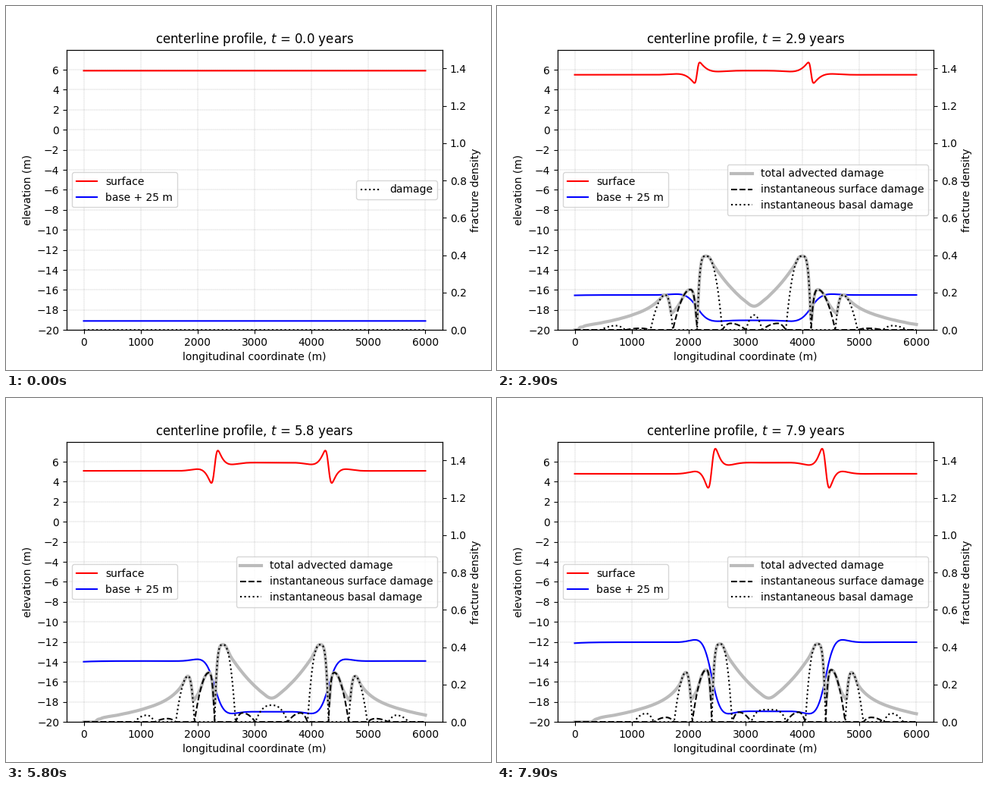
These frames come from a looping animation (640x480 px, 8 s). A matplotlib script:

```python
import math

import matplotlib.pyplot as plt
import numpy as np
from matplotlib.animation import FuncAnimation

FRAMES = 80
SPEED = 51.5  # ice velocity, m per year
x = np.linspace(0, 6000, 1201)
erf = np.vectorize(math.erf)


def edges(t):
    return 2000 + SPEED * t, 4000 + SPEED * t


def flex_length(t):
    return 207 + 290 * math.exp(-t / 1.7) + 290 * math.exp(-t / 0.4)


def flexed_step(v):
    """Step from 0 to 1 smoothed like a bending beam."""
    half = 0.5 * np.exp(-np.abs(v)) * np.cos(v)
    return np.where(v < 0, half, 1 - half)


def profile(t):
    """Ice surface and shifted base along the centerline."""
    left, right = edges(t)
    width = 0.6 * flex_length(t)
    base_in = -19.1 + 0.02 * t
    lift = flexed_step((left - x) / width) + flexed_step((x - right) / width)
    base = base_in + 0.875 * t * lift - 0.0125 * t * np.exp(-x / 250)
    spread = 14 * math.sqrt(t) + 1e-6
    melted = 1 + 0.5 * (erf((left - x) / spread / 2**0.5)
                        + erf((x - right) / spread / 2**0.5))
    thick = 5.9 - base_in - 1.015 * t * melted + 0.0125 * t * np.exp(-x / 250)
    return base + thick, base


def bump(d, start, peak, end, near=3.0, far=1.9):
    """Unit hump that is zero outside start..end."""
    rise = np.clip((peak - d) / (peak - start), 0, 1) ** near
    fall = np.clip((d - peak) / (end - peak), 0, 1) ** far
    return 1 - np.maximum(rise, fall)


def join(a, b):
    return np.cbrt(a**3 + b**3)


def damage(s, t):
    """Instantaneous surface and basal damage at positions s."""
    left, right = edges(t)
    size = flex_length(t)
    out = np.maximum(left - s, s - right) / size
    dl, dr = (s - left) / size, (right - s) / size

    def decay(tau):
        return math.exp(-t / tau)

    surf = (0.295 - 0.19 * decay(3.2) - 0.08 * decay(0.8)) * bump(out, 0, 0.48, 1.64)
    surf += 0.0031 * t * bump(out, 3.15, 3.8, 4.85, 2, 2)
    inner = 0.056 * (1 - decay(2.9))
    surf += inner * join(bump(dl, 1.7, 2.25, 3.3, 2, 2), bump(dr, 1.7, 2.25, 3.3, 2, 2))

    base = (0.29 - 0.235 * decay(3.5) - 0.03 * decay(0.4)) * bump(out, 1.64, 2.17, 3.15, 2.5)
    base += (0.01 + 0.0045 * t) * bump(out, 4.85, 5.5, 6.5, 2, 2)
    peak = max(0.5, 0.72 - 0.0021 * (size - 210))
    main = 0.42 - 0.09 * decay(2.2) - 0.15 * decay(0.5)
    base += main * join(bump(dl, 0, peak, 1.7, 4, 2.4), bump(dr, 0, peak, 1.7, 4, 2.4))
    c0, c1 = left + 3.3 * size, right - 3.3 * size
    if c1 > c0:
        z = np.abs(2 * s - c0 - c1) / (c1 - c0)
        height = np.interp(t, [1.8, 2.9, 4.7, 6.6, 7.9], [0, 0.08, 0.103, 0.08, 0.066])
        base += height * np.clip(1 - z ** (2 + 0.7 * max(t - 5, 0)), 0, 1)
    return surf, base


def advect():
    """Running maximum of damage carried along with the ice."""
    grid = np.arange(-500, 6001, 10.0)
    carried = np.zeros_like(grid)
    totals = [np.zeros_like(x)]
    for i in range(1, FRAMES):
        t = i / 10
        carried[1:-1] += 0.04 * np.diff(carried, 2)
        now = np.maximum(*damage(grid + SPEED * t, t))
        now[grid + SPEED * t < 0] = 0
        carried = np.maximum(carried, now)
        totals.append(np.interp(x - SPEED * t, grid, carried))
    return totals


totals = advect()

fig, ax = plt.subplots(figsize=(6.4, 4.8), dpi=100)
ax2 = ax.twinx()
surface_line, = ax.plot(x, x * 0, "r", label="surface")
base_line, = ax.plot(x, x * 0, "b", label="base + 25 m")
total_line, = ax2.plot(x, x * 0, color="#bbbbbb", lw=3, label="total advected damage")
surf_dmg, = ax2.plot(x, x * 0, "k--", label="instantaneous surface damage")
base_dmg, = ax2.plot(x, x * 0, "k:")

ax.set(xlim=(-300, 6300), ylim=(-20, 8), yticks=range(-20, 7, 2),
       xlabel="longitudinal coordinate (m)", ylabel="elevation (m)")
ax2.set(ylim=(0, 1.5), ylabel="fracture density")
ax.grid(color="k", linestyle="--", linewidth=0.1)
ax.legend(loc="center left")


def draw(i):
    t = i / 10
    surface, base = profile(t)
    surface_line.set_ydata(surface)
    base_line.set_ydata(base)
    started = i > 0
    surf, basal = damage(x, t) if started else (x * 0, x * 0)
    total_line.set_ydata(totals[i])
    surf_dmg.set_ydata(surf)
    base_dmg.set_ydata(basal)
    total_line.set_visible(started)
    surf_dmg.set_visible(started)
    base_dmg.set_label("instantaneous basal damage" if started else "damage")
    shown = [total_line, surf_dmg, base_dmg] if started else [base_dmg]
    ax2.legend(handles=shown, loc="center right")
    ax.set_title(f"centerline profile, $t$ = {t:.1f} years")
    return []


anim = FuncAnimation(fig, draw, frames=FRAMES, interval=100, repeat=True,
                     repeat_delay=0, blit=False)
plt.show()
```
